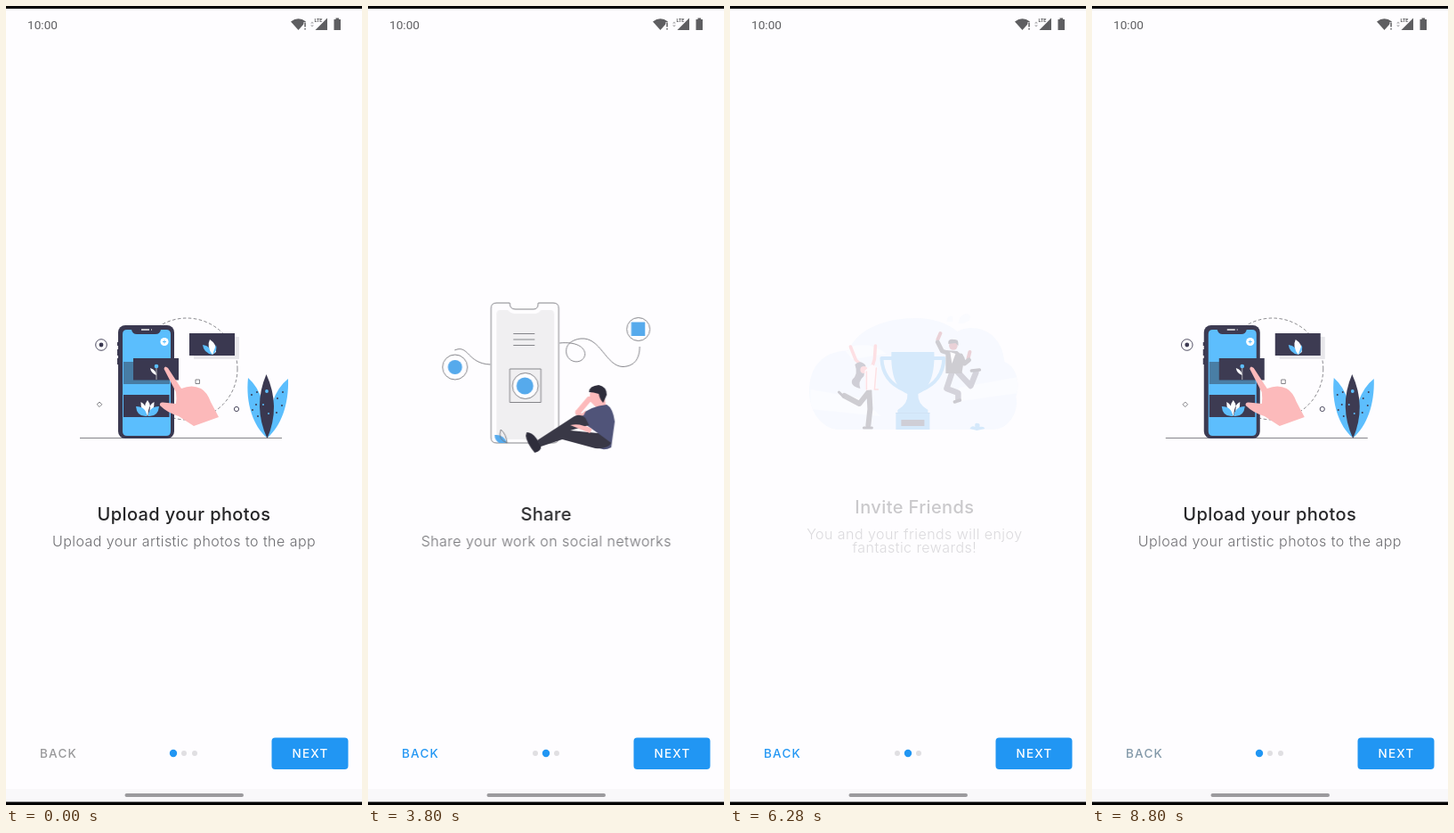
Recreate the animation shown at these times as an HTML page. Size 400 px wide and 896 px high, loop 8.84 s.

```html
<!DOCTYPE html>
<html lang="en">
<head>
<meta charset="utf-8">
<title>Onboarding</title>
<style>
html, body { margin: 0; width: 100%; height: 100%; overflow: hidden; background: #fefdff }
svg { display: block; width: 100vw; height: 100vh }
text { font-family: Inter, "Open Sans", sans-serif; text-anchor: middle }
.title { font-size: 20px; font-weight: 500; letter-spacing: .4px; fill: #252527 }
.sub { font-size: 16px; font-weight: 350; letter-spacing: .45px; fill: #6c6c70 }
.btn { font-size: 13.5px; font-weight: 500; letter-spacing: 1.25px }
.line { fill: none; stroke: #77777c; stroke-width: .9 }
.dark { fill: #3a3850 }
.blue { fill: #5bbefd }
.sky { fill: #52a8ec }
.skin { fill: #fcb9ba }
.white { fill: #fff }
.limb { fill: none; stroke-linecap: round; stroke-linejoin: round }
</style>
</head>
<body>
<svg viewBox="0 0 400 896">
  <defs>
    <clipPath id="nextClip"><rect x="298.500" y="820.500" width="86" height="35.500" rx="4"/></clipPath>
    <clipPath id="backClip"><rect x="16" y="820.500" width="86" height="35.500" rx="4"/></clipPath>
    <clipPath id="cloudClip"><use href="#cloud"/></clipPath>
  </defs>
  <rect width="400" height="896" fill="#fefdff"/>
  <rect y="878" width="400" height="15" fill="#f9f8fa"/>

  <!-- upload -->
  <g class="page">
    <circle class="line" cx="203" cy="407" r="57" stroke-dasharray="3.5 2.5"/>
    <path class="line" d="M83 484.5H310"/>
    <path class="dark" d="M125 377h3v4h-3zM125 385h3v7h-3zM125 395h3v7h-3z"/>
    <rect class="dark" x="126" y="358" width="63" height="127" rx="8"/>
    <path class="blue" d="M136 363H141Q142 368 147 368H168Q173 368 174 363H180Q185 363 185 368V477Q185 482 180 482H136Q131 482 131 477V368Q131 363 136 363Z"/>
    <path d="M152 363H161M163 363h.8" stroke="#eee" stroke-width="1.4"/>
    <circle class="white" cx="178" cy="376.5" r="4.6"/>
    <path d="M176 376.5h4M178 374.5v4" stroke="#5bbefd"/>
    <circle class="line" cx="107" cy="380" r="6.3" style="stroke:#3a3850"/>
    <circle class="dark" cx="107" cy="380" r="2.4"/>
    <path class="line" d="M105 444l2.8 2.8-2.8 2.8-2.8-2.8zM213 419h4.5v4.5H213z"/>
    <circle class="line" cx="259" cy="452" r="2.6" style="stroke:#3a3850"/>

    <path fill="#e8e7eb" d="M211 371h51v25h-51z"/>
    <path class="dark" d="M206 367h51v25h-51z"/>
    <path class="blue" d="M221 380Q230 381 232 391Q222 389 221 380Z"/>
    <path class="white" d="M229 374Q237 379 236 388L232 391Q225 382 229 374Z"/>
    <path class="blue" d="M236 380Q238 387 232 391Z"/>

    <path fill="#477ca4" d="M132 399h52v25h-52z"/>
    <path class="dark" d="M143 395h51v24.5h-51z"/>
    <path d="M169 404v15" stroke="#ccc" stroke-width=".8"/>
    <circle class="blue" cx="169" cy="404" r="2.3"/>
    <path class="white" d="M162 406Q168.500 408 169 414Q163 412 162 406Z"/>

    <path class="dark" d="M132 436h51.500v25H132z"/>
    <path class="white" d="M151.500 444Q158 447 158.500 458Q151 454 151.500 444ZM166.500 444Q160 447 159.500 458Q167 454 166.500 444ZM159 442Q165 449 159 460Q153 449 159 442Z"/>
    <path class="blue" d="M146 449Q157 449 158.500 460Q147 461 146 449ZM172 449Q161 449 159.500 460Q171 461 172 449Z"/>
    <path class="skin" d="M177.500 407Q178 402.500 182 406L197 429Q209 424 219 429Q226 433 230 444L239 461L211 471L194 460Q181 456 173 448Q172 444.500 176 444.500L191 446Q192 440 191 433Z"/>

    <path class="blue" d="M272 417C269 446 278 471 293 484Q294 436 272 417ZM317 418C318 447 309 471 294 484Q294 436 317 418Z"/>
    <path class="dark" d="M292.500 413Q309 449 293.500 485Q277 449 292.500 413Z"/>
    <circle class="blue" cx="293" cy="432" r="1.9"/>
    <g id="seeds" class="dark"></g>
    <text class="title" x="200" y="577">Upload your photos</text>
    <text class="sub" x="200" y="605.500">Upload your artistic photos to the app</text>
  </g>

  <!-- share -->
  <g class="page">
    <g transform="translate(1 0)">
      <path class="line" d="M143 333H158Q158 340 164 340H185Q190 340 190 333H207Q213 333 213 339V484Q213 490 207 490H143Q137 490 137 484V339Q137 333 143 333Z"/>
      <path fill="#f0eff1" d="M147 341H156Q159 345 164 345H186Q190 345 193 341H204Q208 341 208 346V481Q208 486 204 486H147Q143 486 143 481V346Q143 341 147 341Z"/>
      <path class="line" d="M162 367.500H186M162 374H186M162 380.500H186M158 407h35v37.500h-35z"/>
      <path class="line" d="M96 386C112 379 110 401 136 402M214 378C233 376 243 383 242.500 391C241 401 226 402 222 391C219 380 228 374 238 373C260 371 266 404 285 404.500C300 404 304 393 304 382"/>
      <g fill="#fefdff" stroke="#77777c" stroke-width=".9">
        <circle cx="175.500" cy="426" r="14.500"/>
        <circle cx="96.500" cy="405" r="14"/>
        <circle cx="302.500" cy="362.500" r="13"/>
      </g>
      <circle class="sky" cx="175" cy="426" r="9.500"/>
      <circle class="sky" cx="96.500" cy="405" r="8"/>
      <rect class="sky" x="294.500" y="354.500" width="15.500" height="15.500"/>
      <path class="sky" d="M141 481Q151 480 155 490H146Q141 487 141 481Z"/>
      <path class="line" d="M148 475Q154 480 155 490Q144 486 148 475Z"/>

      <path class="skin" d="M248 434Q253 429 264 433L266 448L255 450L248 443Z"/>
      <path fill="#4c5076" d="M238 459Q248 449 267 447Q274 451 276 466L272 495Q263 500 254 494L257 479L240 467Z"/>
      <path class="limb" stroke="#fcb9ba" stroke-width="6" d="M247 441L236 454"/>
      <path class="skin" d="M232 453L239 457L244 453L241 459L236 461Q230 459 232 453ZM225 470Q236 466 250 474L249 478Z"/>
      <path fill="#353442" d="M189 487L226 463Q236 455 243 462L247 470L226 476L257 479L272 490Q268 497 254 496L217 486L193 494Z"/>
      <path class="skin" d="M226 470Q237 467 250 475L248 479Z"/>
      <path fill="#292837" d="M177 478Q183 478 188 485L193 493Q194 499 186 501Q177 490 176 482Z"/>
      <path fill="#292837" d="M247 433Q247 426 258 425Q267 427 267 436L263 445Q259 441 258 435Q252 433 247 433Z"/>
    </g>
    <text class="title" x="200" y="577">Share</text>
    <text class="sub" x="200" y="605.500">Share your work on social networks</text>
  </g>

  <!-- invite -->
  <g class="page">
    <path id="cloud" fill="#e1effc" d="M112 475C77 468 75 418 92 400C102 388 116 387 126 386C136 361 170 350 200 350C225 350 240 358 248 365C266 355 298 363 301 399C315 404 319 424 314 438C318 454 306 475 288 475Z"/>
    <g fill="#f2f8fe" clip-path="url(#cloudClip)">
      <path d="M120 384Q150 374 168 390L130 396ZM83 430L140 440L162 460L83 452ZM250 428L317 416V434L244 444Z"/>
    </g>
    <path fill="#eff6fd" d="M236 354Q237 346 243 348V354ZM249 356Q250 347 257 345Q264 344 262 352Q257 357 249 356Z"/>

    <path class="limb" stroke="#52a8ec" stroke-width="4" d="M176 395H163Q164 421 189 431M220 395H233Q232 421 207 431"/>
    <path class="sky" d="M174 388H222C223 415 216 430 204 435Q203 446 215 453V456H181V453Q193 446 192 435C180 430 173 415 174 388Z"/>
    <path class="sky" d="M179 456h38v19h-38z"/>
    <path d="M179 456.500h38" stroke="#3b8fd4"/>
    <path class="dark" d="M185 464h26v7h-26z"/>

    <g class="limb">
      <path stroke="#f9868b" stroke-width="3.600" d="M128 382L134 397L145 407M156 381L155 396L152 406"/>
      <path stroke="#353442" stroke-width="6" d="M149 432L150 452L148 470M149 432L138 446L121 437"/>
      <path stroke="#292837" stroke-width="3" d="M143 473H152M115 433L120 438"/>
    </g>
    <path class="dark" d="M133 402Q139 396 145 403L143 415Q136 421 139 429Q127 426 130 419Q137 413 133 402Z"/>
    <circle fill="#f9868b" cx="143" cy="408" r="4"/>
    <path fill="#fff3f4" d="M144 409L152 402L158 405L157 430L145 431Z"/>
    <path class="limb" stroke="#f9868b" stroke-width="1.500" d="M146 410V430M157 406L155 430H159"/>

    <g class="limb">
      <path stroke="#a94757" stroke-width="4" d="M229 367L226 374M262 388L260 396"/>
      <path stroke="#353442" stroke-width="5" d="M226 377L231 387L240 390M252 392L256 401L261 397"/>
      <path stroke="#4d4c66" stroke-width="6.500" d="M242 411L236 429L249 434L249 441M248 410L263 426L269 411"/>
      <path stroke="#292837" stroke-width="3.500" d="M245 444L251 442M264 409L273 408"/>
    </g>
    <path fill="#353442" d="M235 386L248 387L256 394L253 412H235Z"/>
    <path class="white" d="M240 388L246 390L242 401Z"/>
    <circle fill="#a94757" cx="243.500" cy="381" r="4.800"/>
    <path fill="#292837" d="M238 379Q237 373 244 374Q250 373 249 381L246 378Z"/>
    <path class="sky" d="M262 474Q264 470 268 472Q267 467 271 468Q274 468 273 472Q278 471 279 474L270 476Z"/>
    <text class="title" x="200" y="569">Invite Friends</text>
    <text class="sub" x="200" y="598">You and your friends will enjoy</text>
    <text class="sub" x="200" y="613">fantastic rewards!</text>
  </g>

  <!-- controls -->
  <circle class="dot" cx="188" cy="838"/>
  <circle class="dot" cx="200" cy="838"/>
  <circle class="dot" cx="212" cy="838"/>
  <g clip-path="url(#backClip)"><circle id="backInk" cx="58" cy="838" fill="#2196f3"/></g>
  <text id="back" class="btn" x="59" y="843">BACK</text>
  <rect id="nextBox" x="298.500" y="820.500" width="86" height="35.500" rx="4"/>
  <g clip-path="url(#nextClip)"><circle id="nextInk" cx="342" cy="838" fill="#fff"/></g>
  <text id="next" class="btn" x="342" y="843">NEXT</text>

  <!-- system bars -->
  <rect width="400" height="3" fill="#000"/>
  <rect y="892.500" width="400" height="3.500" fill="#000"/>
  <rect x="133.500" y="883" width="133.500" height="4" rx="2" fill="#9b9a9d"/>
  <g fill="#5e5e61">
    <text x="41" y="25.500" style="font:13.600px Roboto,sans-serif">10:00</text>
    <path d="M320 17.500Q328.500 11 337 17.500L328.500 27Z"/>
    <path d="M334.500 18h3v9h-3z" fill="#fefdff"/>
    <path d="M335.300 18.500h1.500v5h-1.500zM335.300 25h1.500v1.500h-1.500z"/>
    <path d="M342 19.500l2-2 2 2zM342 21.500l2 2 2-2z" opacity=".5"/>
    <path d="M361 13.500V27H347.500Z"/>
    <text x="351" y="18" style="font:bold 5.500px Roboto,sans-serif;stroke:#fefdff;stroke-width:1.500px;paint-order:stroke">LTE</text>
    <path d="M370.500 13.500h3.500v1.500h2V27h-7.500V15h2z"/>
  </g>
</svg>
<script>
const LOOP = 8840, SLIDE = 1500, SHIFT = 30;
const BLUE = [33, 150, 243], GREY = [152, 152, 154], SLATE = [130, 152, 168];
// press and release times; a release starts the page change
const taps = [
  { press: 2360, at: 2500, from: 0, to: 1 },
  { press: 3960, at: 4100, from: 1, to: 2 },
  { press: 5790, at: 5900, from: 2, to: 1 },
  { press: 7340, at: 7480, from: 1, to: 0 }
];
const $ = id => document.getElementById(id);
const pages = [...document.querySelectorAll('.page')];
const dots = [...document.querySelectorAll('.dot')];
const clamp = v => Math.min(1, Math.max(0, v));

$('seeds').innerHTML = [[276, 436], [282, 433], [281, 447], [277, 453], [283, 460], [311, 433], [305, 440], [310, 448], [304, 456]]
  .map(([x, y]) => `<circle cx="${x}" cy="${y}" r="1"/>`).join('') +
  [[289, 447], [295, 457]].map(([x, y]) => `<circle class="blue" cx="${x}" cy="${y}" r="1"/>`).join('');

function bezier(x1, y1, x2, y2) {
  const curve = (a, b, s) => 3 * a * s * (1 - s) ** 2 + 3 * b * s * s * (1 - s) + s ** 3;
  return x => {
    let lo = 0, hi = 1;
    for (let i = 0; i < 24; i++) {
      const mid = (lo + hi) / 2;
      if (curve(x1, x2, mid) < x) lo = mid; else hi = mid;
    }
    return curve(y1, y2, lo);
  };
}
const standard = bezier(.4, 0, .2, 1);
const decelerate = bezier(0, 0, .2, 1);
const accelerate = bezier(.4, 0, 1, 1);

const mix = (a, b, k) => `rgb(${a.map((v, i) => Math.round(v + (b[i] - v) * k))})`;

function place(page, x, opacity) {
  page.setAttribute('transform', `translate(${x} 0)`);
  page.setAttribute('opacity', opacity);
}

function ink(el, tap, t) {
  const grow = clamp((t - tap.press) / 250);
  const fade = 1 - clamp((t - tap.at) / 250);
  el.setAttribute('r', 8 + 44 * grow);
  el.setAttribute('opacity', .16 * clamp((t - tap.press) / 60) * fade);
}

function draw(t) {
  const tap = taps.filter(p => t >= p.at).pop();
  const current = tap ? tap.to : 0;
  pages.forEach((p, i) => place(p, 0, i === current ? 1 : 0));
  if (tap) {
    const k = clamp((t - tap.at) / SLIDE);
    const dir = Math.sign(tap.to - tap.from), move = standard(k);
    place(pages[tap.from], -dir * SHIFT * move, 1 - accelerate(clamp(k / .3)));
    place(pages[tap.to], dir * SHIFT * (1 - move), decelerate(clamp((k - .3) / .7)));
  }

  dots.forEach((d, i) => {
    d.setAttribute('r', i === current ? 4.2 : 3);
    d.setAttribute('fill', i === current ? '#2196f3' : '#e0dfe2');
  });
  const last = current === 2;
  $('nextBox').setAttribute('fill', last ? '#e0dfe1' : '#2196f3');
  $('next').setAttribute('fill', last ? '#8d8c90' : '#fff');
  const end = taps[3].at;
  $('back').setAttribute('fill', t < end
    ? mix(GREY, BLUE, clamp((t - taps[0].at) / 200))
    : mix(BLUE, SLATE, clamp((t - end) / 200)));

  ink($('nextInk'), t < 3600 ? taps[0] : taps[1], last ? 0 : t);
  ink($('backInk'), t < 7000 ? taps[2] : taps[3], t < end ? t : 0);
}

function frame() {
  draw(performance.now() % LOOP);
  requestAnimationFrame(frame);
}
frame();
</script>
</body>
</html>
```
